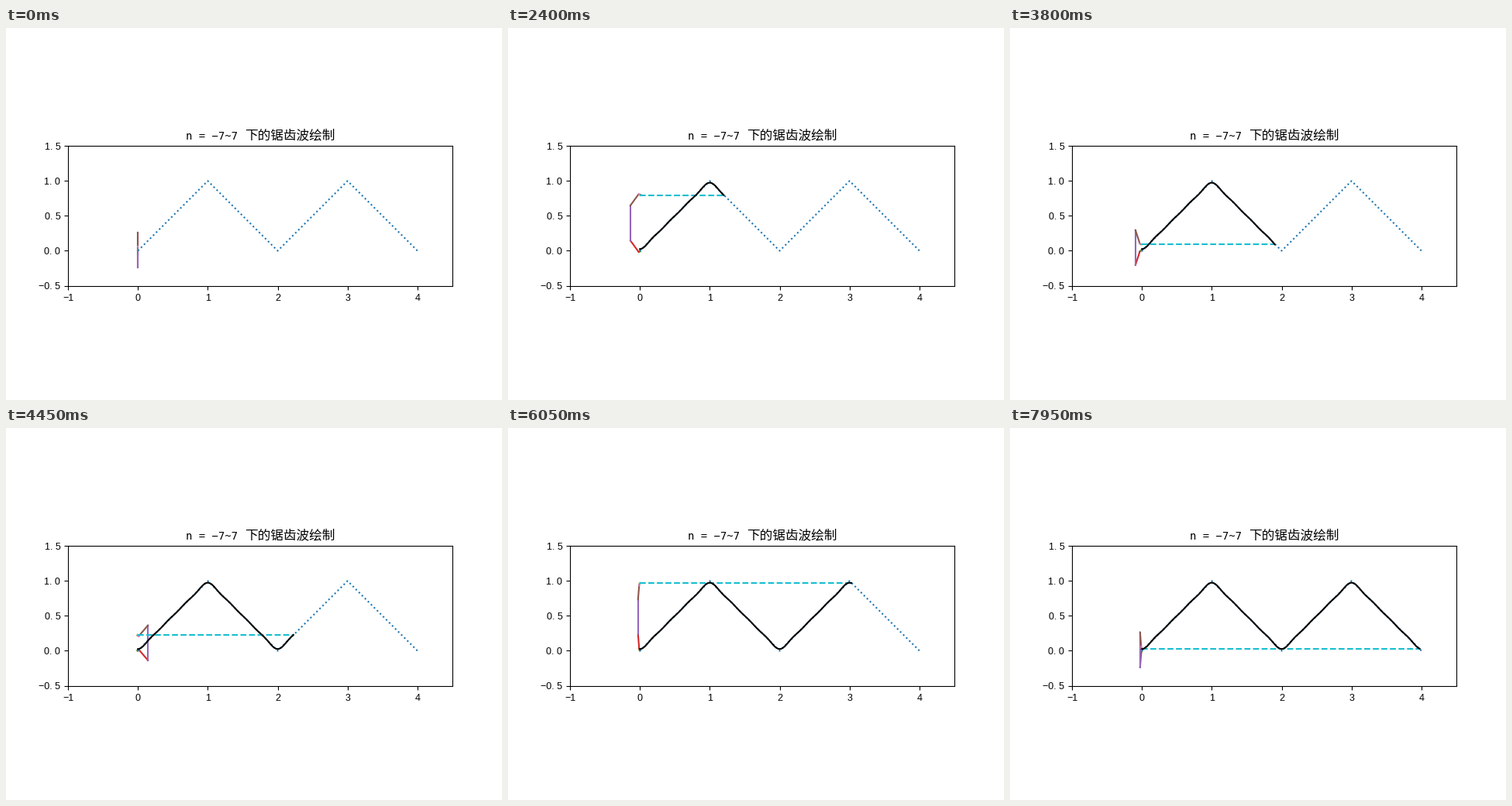
A matplotlib script that plays this animation: 640x480 px, repeating every 8 s.

```python
import numpy as np
import matplotlib.pyplot as plt
from matplotlib.animation import FuncAnimation

N = 7
FRAMES, INTERVAL = 160, 50
STEP = 4 / FRAMES

# Nonzero Fourier terms of a triangle wave with period 2
orders = [n for n in range(-N, N + 1) if n == 0 or n % 2]
coefs = [0.5 if n == 0 else -2 / (np.pi * n) ** 2 for n in orders]
k, c = np.array(orders), np.array(coefs)


def joints(t):
    """Chain of rotating vectors, as complex points from the origin."""
    return np.concatenate([[0], np.cumsum(c * np.exp(1j * np.pi * k * t))])


times = np.arange(FRAMES) * STEP
wave = np.array([joints(t)[-1].real for t in times])

plt.rcParams["font.family"] = "Liberation Sans"
fig, ax = plt.subplots(figsize=(6.4, 4.8), dpi=100)
ax.set_aspect("equal")
ax.set_xlim(-1, 4.5)
ax.set_ylim(-0.5, 1.5)


def minus(text):
    return text.replace("-", "\u2212")


xticks = np.arange(-1, 5)
yticks = np.arange(-0.5, 1.6, 0.5)
ax.set_xticks(xticks, [minus(f"{v}") for v in xticks])
ax.set_yticks(yticks, [minus(f"{v:.1f}").replace(".", ". ") for v in yticks])
ax.tick_params(labelsize=9)
ax.tick_params(axis="x", pad=4)

# Half-width and full-width parts of the title
base = 1 - 143.7 / 480
fig.text(232 / 640, base, minus("n = -7~7"), family="DejaVu Sans Mono", size=10)
fig.text(308 / 640, base, "下的锯齿波绘制", family="Noto Sans CJK JP", size=12)

arms = [ax.plot([], [])[0] for _ in orders]
link, = ax.plot([], [], "--", color="C9")
ax.plot(range(5), [0, 1, 0, 1, 0], ":", color="C0")
trace, = ax.plot([], [], "k")


def update(i):
    p = joints(times[i])
    for arm, a, b in zip(arms, p, p[1:]):
        arm.set_data([a.imag, b.imag], [a.real, b.real])
    link.set_data([p[-1].imag, times[i]], [wave[i], wave[i]])
    trace.set_data(times[:i + 1], wave[:i + 1])
    return [*arms, link, trace]


anim = FuncAnimation(fig, update, frames=FRAMES, interval=INTERVAL,
                     repeat=True, repeat_delay=0)
plt.show()
```
